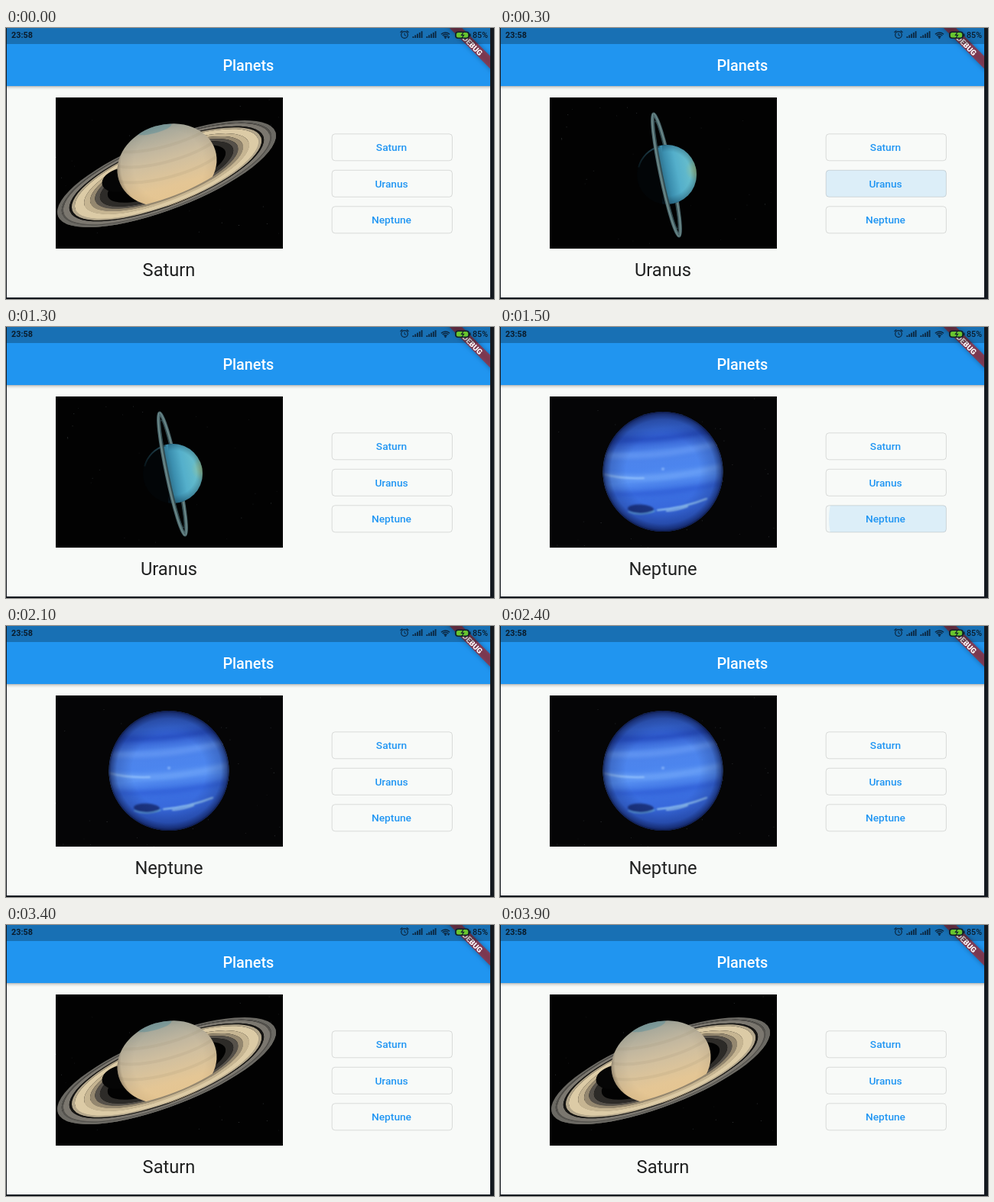
Write an HTML page with a canvas that moves like this. It is 638 px wide and 355 px high and loops after 4000 ms.

```html
<!DOCTYPE html>
<html lang="en">
<head>
<meta charset="utf-8">
<title>Planets</title>
<style>
html, body { margin: 0; width: 100%; height: 100%; overflow: hidden; background: #14191f; }
canvas { display: block; width: 638px; height: 355px; }
</style>
</head>
<body>
<canvas id="stage" width="638" height="355"></canvas>
<script>
const ctx = document.getElementById('stage').getContext('2d');
const TAU = Math.PI * 2;
const LOOP = 4000;
const BLUE = '#2196f3';
const BAR = '#2095f0';
const PAPER = '#f8faf8';
const INK = '#0c2740';
const PHOTO = { x: 65, y: 91, w: 297, h: 198 };
const BUTTONS = [['Saturn', 138.5], ['Uranus', 186], ['Neptune', 233.5]];
const TAPS = [
  { name: 'Uranus', start: 200, end: 700, x: 505 },
  { name: 'Neptune', start: 1400, end: 1900, x: 520 },
  { name: 'Saturn', start: 3000, end: 3400, x: 505 }
];

function text(str, x, y, size, weight, color, align = 'center') {
  ctx.font = `${weight} ${size}px Roboto, "Open Sans", sans-serif`;
  ctx.textAlign = align;
  ctx.fillStyle = color;
  ctx.fillText(str, x, y);
}

function rect(x, y, w, h, color) {
  ctx.fillStyle = color;
  ctx.fillRect(x, y, w, h);
}

function oval(x, y, rx, ry, color, angle = 0) {
  ctx.beginPath();
  ctx.ellipse(x, y, rx, ry, angle, 0, TAU);
  ctx.fillStyle = color;
  ctx.fill();
}

function pill(x, y, w, h, r, color) {
  ctx.beginPath();
  ctx.roundRect(x, y, w, h, r);
  ctx.fillStyle = color;
  ctx.fill();
}

function line(points, color, width) {
  ctx.beginPath();
  points.forEach(([x, y], i) => i ? ctx.lineTo(x, y) : ctx.moveTo(x, y));
  ctx.strokeStyle = color;
  ctx.lineWidth = width;
  ctx.stroke();
}

function withStops(gradient, stops) {
  stops.forEach(([at, color]) => gradient.addColorStop(at, color));
  return gradient;
}

const linear = (x0, y0, x1, y1, stops) =>
  withStops(ctx.createLinearGradient(x0, y0, x1, y1), stops);
const radial = (x, y, r0, r1, stops) =>
  withStops(ctx.createRadialGradient(x, y, r0, x, y, r1), stops);

function saved(draw) {
  ctx.save();
  draw();
  ctx.restore();
}

function stars(seed, count) {
  let s = seed;
  const rnd = () => (s = (s * 16807) % 2147483647) / 2147483647;
  for (let i = 0; i < count; i++) {
    const x = PHOTO.x + rnd() * PHOTO.w;
    const y = PHOTO.y + rnd() * PHOTO.h;
    rect(x, y, 1, 1, `rgba(150,160,165,${0.08 + rnd() * 0.25})`);
  }
}

// Saturn: each band is [outer, inner, colour] as a share of the ring size

const RING = { x: 210, y: 191, a: 152.4, b: 46, tilt: -0.372 };
const FRONT_BANDS = [
  [1, 0.96, '#6b6963'], [0.96, 0.945, '#55534e'], [0.945, 0.89, '#7b776f'],
  [0.89, 0.868, '#161513'], [0.868, 0.84, '#b3a68b'], [0.84, 0.755, '#dccba6'],
  [0.755, 0.7, '#c6b592'], [0.7, 0.655, '#94876f']
];
const BACK_BANDS = [...FRONT_BANDS, [0.655, 0.61, '#56514a'], [0.61, 0.54, '#2d2b28']];

function ringBands(bands) {
  for (const [outer, inner, color] of bands) {
    ctx.beginPath();
    ctx.ellipse(0, 0, RING.a * outer, RING.b * outer, 0, 0, TAU);
    ctx.ellipse(0, 0, RING.a * inner, RING.b * inner, 0, 0, TAU, true);
    ctx.fillStyle = color;
    ctx.fill();
  }
}

function inRing(draw) {
  saved(() => {
    ctx.translate(RING.x, RING.y);
    ctx.rotate(RING.tilt);
    draw();
  });
}

function saturn() {
  stars(41, 26);
  inRing(() => ringBands(BACK_BANDS));
  oval(150, 199, 25, 15, '#050505', -0.25);
  saved(() => {
    ctx.beginPath();
    ctx.ellipse(210.5, 179.5, 66, 53, -0.3, 0, TAU);
    ctx.clip();
    rect(140, 120, 140, 120, linear(194, 125, 224, 234, [
      [0, '#8b9791'], [0.12, '#aaaa9b'], [0.3, '#c2b79f'], [0.45, '#d0bf9f'],
      [0.6, '#dac39b'], [0.75, '#e4c695'], [1, '#e6c48e']
    ]));
    oval(193, 132, 24, 6, 'rgba(95,145,155,.5)', -0.25);
    for (let i = 0; i < 3; i++) {
      ctx.beginPath();
      ctx.ellipse(206 + i * 3, 136 + i * 20, 72, 19, -0.27, 0, Math.PI);
      ctx.strokeStyle = 'rgba(150,130,105,.13)';
      ctx.lineWidth = 4;
      ctx.stroke();
    }
    rect(140, 120, 140, 120, radial(213, 180, 46, 70, [
      [0, 'rgba(20,14,8,0)'], [0.7, 'rgba(20,14,8,.06)'], [1, 'rgba(20,14,8,.4)']
    ]));
  });
  inRing(() => {
    ctx.beginPath();
    ctx.rect(-160, 0, 320, 60);
    ctx.clip();
    ringBands(FRONT_BANDS);
  });
}

// Uranus

function uranusRing(from, to) {
  for (const [rx, ry, color, width] of [
    [7.4, 81.5, '#4e6b70', 4.6], [7.6, 82, '#75918f', 1.2], [5, 72, '#2e4549', 1.3]
  ]) {
    ctx.beginPath();
    ctx.ellipse(217.5, 192.5, rx, ry, -0.207, from, to);
    ctx.strokeStyle = color;
    ctx.lineWidth = width;
    ctx.stroke();
  }
}

function uranus() {
  stars(97, 34);
  uranusRing(-Math.PI / 2, Math.PI / 2);
  oval(218, 192, 39, 39, '#020507');
  saved(() => {
    ctx.beginPath();
    ctx.arc(218, 192, 39, 0, TAU);
    ctx.clip();
    ctx.beginPath();
    ctx.moveTo(202, 150);
    ctx.lineTo(262, 150);
    ctx.lineTo(262, 235);
    ctx.lineTo(223, 235);
    ctx.quadraticCurveTo(209, 195, 202, 150);
    ctx.fillStyle = linear(208, 198, 258, 188, [
      [0, '#286078'], [0.25, '#3b8faf'], [0.5, '#54afcb'], [0.82, '#66bdcc'], [1, '#79b9a8']
    ]);
    ctx.fill();
    rect(240, 165, 20, 40, radial(257, 186, 0, 15, [
      [0, 'rgba(180,190,105,.5)'], [1, 'rgba(180,190,105,0)']
    ]));
    rect(212, 150, 48, 84, radial(220, 191, 29, 40, [
      [0, 'rgba(10,40,60,0)'], [1, 'rgba(10,40,60,.4)']
    ]));
  });
  ctx.beginPath();
  ctx.arc(218, 192, 38, Math.PI * 1.08, Math.PI * 1.42);
  ctx.strokeStyle = linear(180, 182, 210, 154, [[0, '#071419'], [1, '#28505f']]);
  ctx.lineWidth = 2;
  ctx.stroke();
  uranusRing(Math.PI / 2, Math.PI * 1.5);
}

// Neptune

function streak(x0, y0, cx, cy, x1, y1, width, color) {
  ctx.beginPath();
  ctx.moveTo(x0, y0);
  ctx.quadraticCurveTo(cx, cy, x1, y1);
  ctx.strokeStyle = color;
  ctx.lineWidth = width;
  ctx.stroke();
}

function neptune() {
  rect(PHOTO.x, PHOTO.y, PHOTO.w, PHOTO.h, '#050506');
  stars(13, 40);
  saved(() => {
    ctx.beginPath();
    ctx.arc(213, 189.5, 78.5, 0, TAU);
    ctx.clip();
    rect(134, 110, 158, 158, linear(205, 111, 221, 268, [
      [0, '#2f55b4'], [0.14, '#3564cf'], [0.22, '#2f5bce'], [0.32, '#4d83ea'],
      [0.46, '#4c85ee'], [0.56, '#5790f2'], [0.66, '#3b70e2'], [0.8, '#3869dc'], [1, '#2a54bd']
    ]));
    ctx.lineCap = 'round';
    ctx.filter = 'blur(2.5px)';
    streak(150, 146, 215, 152, 278, 133, 6, 'rgba(36,72,185,.55)');
    streak(140, 168, 210, 172, 288, 152, 7, 'rgba(120,168,250,.45)');
    streak(136, 194, 195, 205, 288, 183, 7, 'rgba(125,176,252,.5)');
    streak(145, 218, 210, 222, 285, 205, 6, 'rgba(42,82,205,.4)');
    ctx.filter = 'blur(1.2px)';
    streak(136, 193, 158, 199, 188, 198, 2, 'rgba(165,207,255,.75)');
    oval(184, 238.5, 17, 6, '#1c3582', 0.04);
    streak(168, 242, 184, 248, 202, 241, 1.6, 'rgba(125,205,235,.8)');
    streak(206, 240, 240, 237, 270, 225, 2.2, 'rgba(170,220,250,.85)');
    streak(218, 241, 232, 240, 245, 235, 2.2, 'rgba(185,232,245,.7)');
    oval(213, 186, 2, 2, 'rgba(160,200,255,.6)');
    ctx.filter = 'none';
    rect(134, 110, 158, 159, radial(213, 189.5, 48, 79, [
      [0, 'rgba(5,15,65,0)'], [0.65, 'rgba(5,15,65,.2)'], [0.9, 'rgba(5,12,55,.55)'], [1, 'rgba(4,8,35,.85)']
    ]));
  });
}

const PLANETS = { Saturn: saturn, Uranus: uranus, Neptune: neptune };

function photo(name) {
  saved(() => {
    ctx.beginPath();
    ctx.rect(PHOTO.x, PHOTO.y, PHOTO.w, PHOTO.h);
    ctx.clip();
    rect(PHOTO.x, PHOTO.y, PHOTO.w, PHOTO.h, '#020202');
    PLANETS[name]();
  });
}

// Interface

function button([label, y], t) {
  const outline = () => {
    ctx.beginPath();
    ctx.roundRect(426.2, y + 0.3, 157.2, 35, 4);
  };
  const tap = TAPS.find(p => p.name === label && t >= p.start && t < p.end);
  if (tap) {
    const radius = (t - tap.start) * 0.9;
    const fade = Math.min(1, (tap.end - t) / 300);
    saved(() => {
      outline();
      ctx.clip();
      rect(426, y, 158, 36, `rgba(33,150,243,${0.018 * fade})`);
      oval(tap.x, y + 18, radius, radius, `rgba(33,150,243,${0.105 * fade})`);
    });
  }
  outline();
  ctx.strokeStyle = 'rgba(0,0,0,.13)';
  ctx.lineWidth = 1;
  ctx.stroke();
  text(label, 504, y + 22.6, 13.7, 500, BLUE);
}

function signal(x) {
  for (let i = 0; i < 5; i++) {
    const h = 2 + i * 1.7;
    rect(x + i * 2.8, 13 - h, 1.8, h, INK);
  }
}

function wifi(busy) {
  for (const r of [2.8, 5.2, 7.6]) {
    ctx.beginPath();
    ctx.arc(574.5, 13.5, r, Math.PI * 1.24, Math.PI * 1.76);
    ctx.strokeStyle = INK;
    ctx.lineWidth = 1.5;
    ctx.stroke();
  }
  oval(574.5, 12.8, 1.2, 1.2, INK);
  if (busy) {
    ctx.beginPath();
    ctx.moveTo(576.5, 11);
    ctx.lineTo(580.5, 11);
    ctx.lineTo(578.5, 14);
    ctx.fillStyle = INK;
    ctx.fill();
  }
}

function alarm() {
  ctx.beginPath();
  ctx.arc(521, 9, 4.3, 0, TAU);
  ctx.strokeStyle = INK;
  ctx.lineWidth = 1.2;
  ctx.stroke();
  line([[521, 6.5], [521, 9.3], [523, 10.3]], INK, 1);
  line([[515.5, 5.8], [518.3, 3.4]], INK, 1.3);
  line([[526.5, 5.8], [523.7, 3.4]], INK, 1.3);
}

function battery() {
  pill(587, 4.5, 19, 9.5, 4, '#10202a');
  pill(588.8, 6, 15.4, 6.5, 2.5, '#69c62f');
  rect(606, 7.5, 1.5, 3.5, '#10202a');
  line([[598, 5.5], [595.5, 9.3], [598.5, 9.3], [596, 13]], '#10202a', 1.2);
}

function banner() {
  saved(() => {
    ctx.beginPath();
    ctx.rect(1, 0, 632, 353);
    ctx.clip();
    ctx.translate(633, 0);
    ctx.rotate(Math.PI / 4);
    ctx.shadowColor = 'rgba(0,0,0,.5)';
    ctx.shadowBlur = 6;
    rect(-45, 26, 90, 11.6, 'rgba(183,28,28,.63)');
    ctx.shadowColor = 'transparent';
    text('DEBUG', 0, 36.2, 10, 900, '#fff');
  });
}

// The system bar lies over everything, the corner banner included.
function statusBar(t) {
  rect(1, 0, 632, 21, 'rgba(0,0,0,.25)');
  text('23:58', 7, 13, 10.8, 700, '#0a1c2c', 'left');
  alarm();
  signal(531.5);
  signal(549.5);
  wifi(t < 200 || (t >= 3000 && t < 3600));
  battery();
  text('85%', 610, 13, 10.7, 500, '#0a1c2c', 'left');
}

function render(t) {
  rect(0, 0, 638, 355, '#14191f');
  rect(1, 0, 632, 353, PAPER);
  rect(1, 76, 632, 5, linear(0, 76, 0, 81, [
    [0, 'rgba(0,0,0,.27)'], [0.4, 'rgba(0,0,0,.1)'], [1, 'rgba(0,0,0,0)']
  ]));
  rect(1, 0, 632, 76, BAR);
  text('Planets', 316.8, 56.2, 19.8, 500, '#fff');

  const last = TAPS.filter(p => t >= p.start).pop();
  const name = last ? last.name : 'Saturn';
  photo(name);
  text(name, 213, 325.3, 23.7, 400, '#202121');
  BUTTONS.forEach(b => button(b, t));
  banner();
  statusBar(t);
}

const begin = performance.now();
function tick() {
  const t = (performance.now() - begin) % LOOP;
  render(Math.floor(t / 100) * 100);
  requestAnimationFrame(tick);
}
tick();
</script>
</body>
</html>
```
